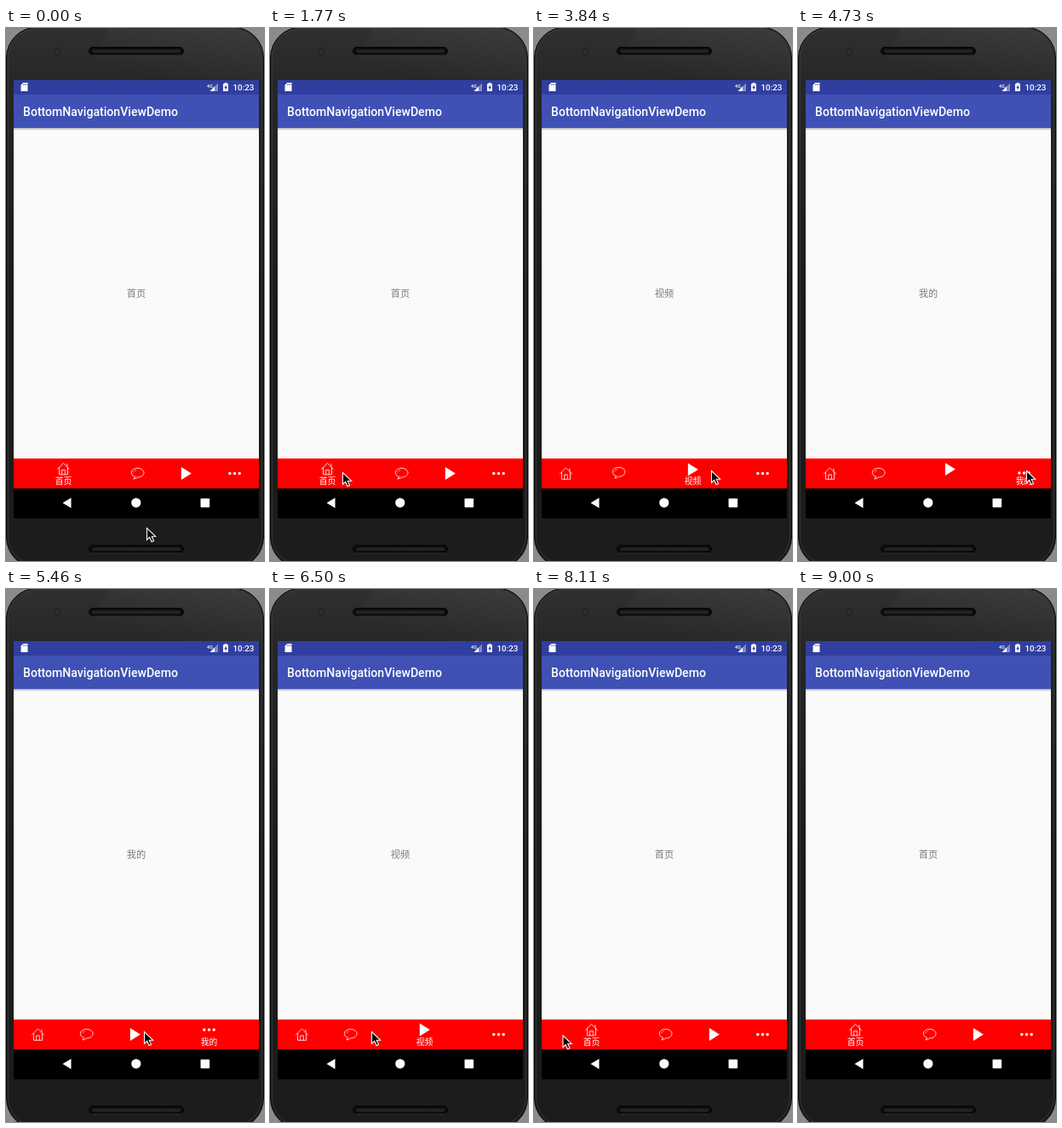
These frames come from a looping animation (303 by 624 pixels, 9.33 s). An HTML page:

```html
<!DOCTYPE html>
<html lang="zh">
<head>
<meta charset="utf-8">
<title>BottomNavigationViewDemo</title>
<style>
  html, body { margin: 0; width: 100%; height: 100%; overflow: hidden; background: #8b8b8b; }
  svg { display: block; width: 303px; height: 624px; }
  text { font-family: Roboto, "Noto Sans CJK SC", "Noto Sans CJK", sans-serif; }
  .bar { fill: #fff; font-weight: 500; }
  .page { font-size: 11.2px; fill: #7b7b7b; text-anchor: middle; }
  .label { font-size: 9.8px; fill: #fff; text-anchor: middle; }
  .line { fill: none; stroke: #fff; stroke-width: .8; stroke-linejoin: round; stroke-linecap: round; }
</style>
</head>
<body>
<svg viewBox="0 0 303 624">
  <defs>
    <linearGradient id="shell" x1="0" y1="0" x2="0" y2="1">
      <stop offset="0" stop-color="#303030"/>
      <stop offset=".1" stop-color="#272727"/>
      <stop offset=".5" stop-color="#1b1b1b"/>
      <stop offset="1" stop-color="#1c1c1c"/>
    </linearGradient>
    <linearGradient id="sheen" x1="0" y1="1" x2="1" y2="0">
      <stop offset=".2" stop-color="#fff" stop-opacity="0"/>
      <stop offset="1" stop-color="#fff" stop-opacity=".06"/>
    </linearGradient>
    <linearGradient id="shade" x1="0" y1="0" x2="0" y2="1">
      <stop offset="0" stop-color="#000" stop-opacity=".3"/>
      <stop offset="1" stop-color="#000" stop-opacity="0"/>
    </linearGradient>
    <pattern id="mesh" width="2" height="2" patternUnits="userSpaceOnUse">
      <rect width="2" height="2" fill="#1e1e1e"/>
      <rect width="1" height="1" fill="#2c2c2c"/>
    </pattern>
    <g id="speaker">
      <rect x="97.5" y=".5" width="111" height="9" rx="4.5" fill="#0c0c0c" stroke="#050505"/>
      <rect x="101" y="3" width="104" height="4" rx="2" fill="url(#mesh)"/>
      <path d="M101 9.8H205" stroke="#3b3b3b" stroke-width=".7"/>
    </g>
  </defs>

  <!-- phone shell -->
  <rect x=".5" y="-1" width="302" height="633" rx="36" fill="url(#shell)" stroke="#0a0a0a"/>
  <rect x="2.5" y="1" width="298" height="628" rx="34" fill="none" stroke="#3c3c3c" stroke-width=".8"/>
  <path d="M120 1H268Q296 5 300 34V61H90Z" fill="url(#sheen)"/>
  <circle cx="60" cy="27.5" r="4" fill="#352a2a" stroke="#1c1c1c"/>
  <use href="#speaker" y="22"/>
  <use href="#speaker" y="605"/>

  <!-- screen -->
  <rect x="9" y="61" width="288" height="513" fill="#fafafa"/>
  <rect x="9" y="61" width="288" height="17" fill="#303f9f"/>
  <rect x="9" y="78" width="288" height="39" fill="#3f51b5"/>
  <rect x="9" y="117" width="288" height="3" fill="url(#shade)"/>
  <path d="M20.3 64H25.5V74H17.5V66.8Z" fill="#fff"/>
  <path d="M20.7 65.3v1.8M22.4 65.3v1.8M24.1 65.3v1.8" stroke="#303f9f" stroke-width=".7"/>
  <text class="bar" x="236" y="69.5" font-size="5.5">4G</text>
  <path d="M249 64.5V74H239.5Z" fill="#fff" fill-opacity=".4"/>
  <path d="M245 68.5V74H239.5Z" fill="#fff"/>
  <path d="M255 65.2h1.7V64h2.6v1.2H261V74H255Z" fill="#fff"/>
  <path d="M258.6 66.3 256.2 70.2h1.5v2.6l2.3-3.8h-1.4Z" fill="#303f9f"/>
  <text class="bar" x="266.5" y="73" font-size="9.8">10:23</text>
  <text class="bar" x="20" y="102.6" font-size="14.08">BottomNavigationViewDemo</text>
  <text class="page" id="page" x="153" y="315">首页</text>

  <!-- tabs, each icon centred on its own origin -->
  <rect x="9" y="504" width="288" height="35" fill="#f00"/>
  <g class="tab">
    <path class="line" d="M-7 .4 0-6.6 7 .4M-5-1.2V6.8H5V-1.2M-1.8 6.8V1.4H1.8V6.8M4.4-5.4V-2.4"/>
  </g>
  <g class="tab">
    <path class="line" d="M-3 4A7.4 5.4 0 1 1 .2 4.5Q-2 6.3-4.8 6.4-3.4 5.4-3 4Z"/>
    <path class="line" d="M-4.9-1.4Q-4.2-3.4-1.8-4" stroke-opacity=".6"/>
  </g>
  <g class="tab"><path d="M-5.7-7.4 6.3 0-5.7 7.4Z" fill="#fff"/></g>
  <g class="tab" fill="#fff">
    <circle cx="-5.7" r="1.7"/><circle r="1.7"/><circle cx="5.7" r="1.7"/>
  </g>
  <text class="label" id="label" y="534.4">首页</text>

  <!-- system keys -->
  <rect x="9" y="539" width="288" height="35" fill="#000"/>
  <g fill="#fff">
    <path d="M66.5 556 76.5 550V562Z"/>
    <circle cx="152.8" cy="555.8" r="5.6"/>
    <rect x="228.5" y="550.7" width="10.6" height="10.6" rx="1"/>
  </g>

  <path id="cursor" d="M.5 .5V14.2L3.7 11.2 6.1 16.5 8.5 15.4 6.2 10.2H10.6Z"
        fill="#000" stroke="#fff" stroke-width="1.1"/>
</svg>
<script>
const LOOP = 9330;
const STEP = 147.6;   // ms per picture; all times below count steps
const SHIFT = 1.56;   // length of one tab change
const names = ['首页', '消息', '视频', '我的'];

// Tab changes walk from the first tab to the last and back
const taps = [17.9, 24.7, 31.85, 40.85, 47.9, 51.9];
const tabAfter = n => 3 - Math.abs(3 - n);

// Cursor moves: leave, arrive, x, y (the tab row unless given)
const moves = [
  [1, 9, 77, 526], [9, 10, 61, 521], [11, 12, 85, 520], [12, 15, 147], [19, 21, 208], [26, 28, 268],
  [34, 37, 162], [38, 39, 155], [42, 45, 101], [48, 51, 26], [54.8, 61, 258, 650],
];

const $ = id => document.getElementById(id);
const tabs = [...document.querySelectorAll('.tab')];
const mix = (a, b, p) => a + (b - a) * p;
const progress = (s, from, to) => Math.min(1, Math.max(0, (s - from) / (to - from)));
const place = (el, x, y) => el.setAttribute('transform', `translate(${x.toFixed(2)} ${y.toFixed(2)})`);

// The selected tab is 117 wide, the others 57
const tabX = (i, active) => 37.5 + 57 * i + (i === active ? 30 : i > active ? 60 : 0);
const tabY = (i, active) => i === active ? 516 : 521.5;

function cursorAt(s) {
  let x = 165, y = 585;
  for (const [leave, arrive, toX, toY = 518] of moves) {
    const p = progress(s, leave, arrive);
    x = mix(x, toX, p);
    y = mix(y, toY, p);
  }
  return [x, y];
}

function draw(time) {
  const s = Math.floor((time + 10) / STEP);
  const n = taps.filter(tap => tap <= s).length;
  const now = tabAfter(n), old = tabAfter(Math.max(0, n - 1));
  const p = n ? progress(s, taps[n - 1], taps[n - 1] + SHIFT) : 1;
  tabs.forEach((tab, i) =>
    place(tab, mix(tabX(i, old), tabX(i, now), p), mix(tabY(i, old), tabY(i, now), p)));
  $('label').setAttribute('x', mix(tabX(now, old), tabX(now, now), p));
  $('label').textContent = $('page').textContent = names[now];
  place($('cursor'), ...cursorAt(s));
}

const begin = performance.now();
function frame() {
  draw((performance.now() - begin) % LOOP);
  requestAnimationFrame(frame);
}
frame();
</script>
</body>
</html>
```
